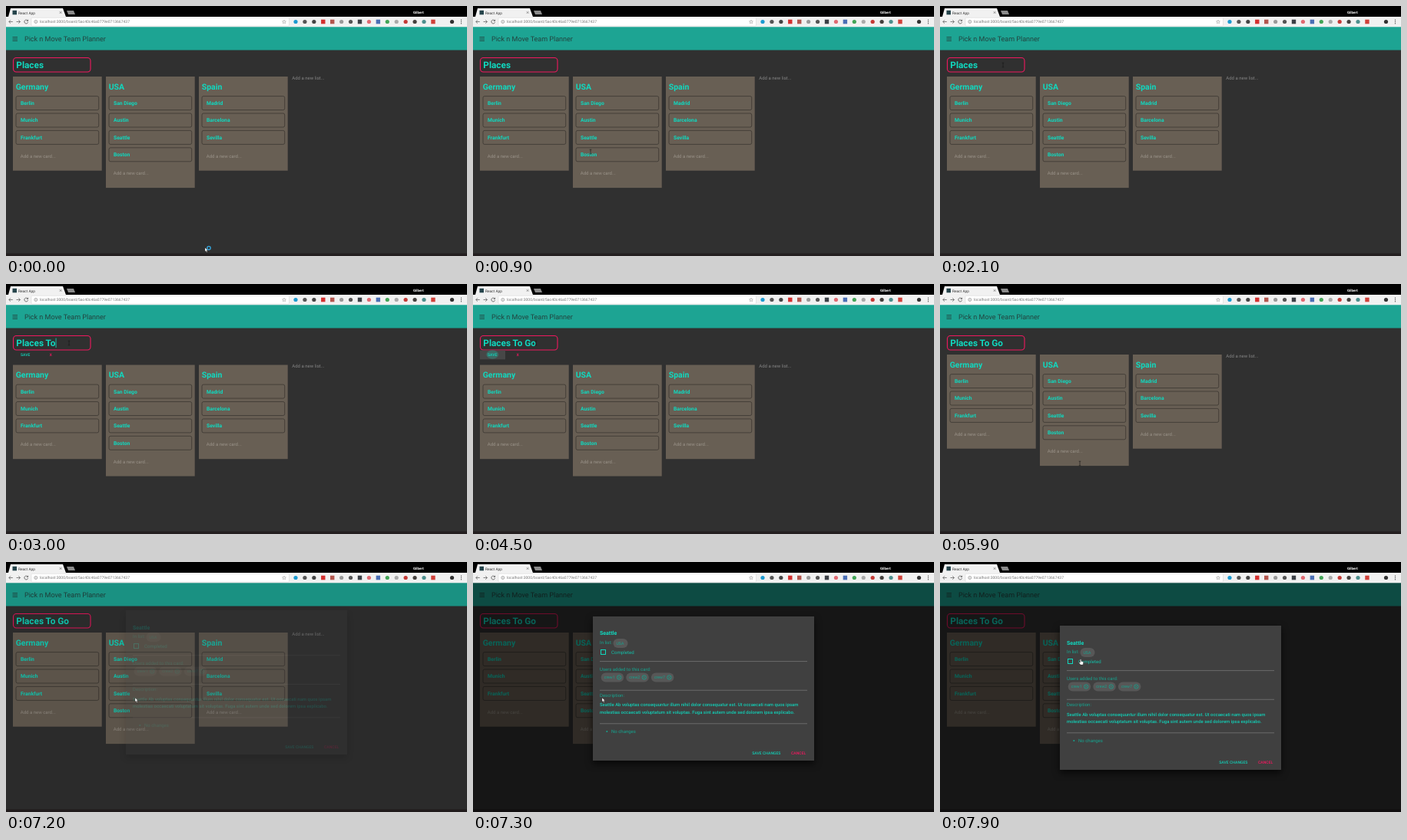
Animation of 600x326 px, one loop 8 s. Source, as an HTML page:

```html
<!DOCTYPE html>
<html lang="en">
<head>
<meta charset="utf-8">
<title>Board</title>
<style>
  html, body { margin: 0; width: 100%; height: 100%; overflow: hidden; background: #303030; }
  svg { display: block; width: 600px; height: 326px; }
  text { font-family: Roboto, Arial, sans-serif; white-space: pre; text-rendering: geometricPrecision; }
</style>
</head>
<body>
<svg id="stage" viewBox="0 0 600 326"></svg>
<script>
const TEAL = '#10d9c0', PINK = '#f0185f', DIM = '#15a48f', SHIFT = 13.5;
const stage = document.getElementById('stage');

function add(parent, tag, attrs, content) {
  const el = document.createElementNS('http://www.w3.org/2000/svg', tag);
  for (const k in attrs) el.setAttribute(k, attrs[k]);
  if (content !== undefined) el.textContent = content;
  return parent.appendChild(el);
}
const group = (parent = stage) => add(parent, 'g', {});
const rect = (p, x, y, width, height, fill, more) => add(p, 'rect', { x, y, width, height, fill, ...more });
const circle = (p, cx, cy, r, fill, more) => add(p, 'circle', { cx, cy, r, fill, ...more });
const line = (p, d, stroke, width = 0.8) => add(p, 'path', { d, stroke, 'stroke-width': width, fill: 'none' });
const text = (p, x, y, size, fill, str, weight = 400) =>
  add(p, 'text', { x, y, 'font-size': size, fill, 'font-weight': weight }, str);
const show = (el, on) => el.setAttribute('visibility', on ? 'visible' : 'hidden');
const move = (el, x, y) => el.setAttribute('transform', `translate(${x} ${y})`);

// Page header and board
rect(stage, 0, 0, 600, 326, '#303030');
rect(stage, 0, 322.5, 600, 3.5, '#241f20');
rect(stage, 0, 27, 600, 30.5, '#1da493');
line(stage, 'M8.5 40.7h6.5M8.5 43h6.5M8.5 45.3h6.5', '#23423e', 0.9);
text(stage, 24, 46, 9, '#23423e', 'Pick n Move Team Planner');

rect(stage, 9.5, 67.5, 100.5, 18.5, 'none', { rx: 4, stroke: PINK, 'stroke-width': 1.1 });
const title = text(stage, 13.3, 81, 11.8, TEAL, 'Places', 700);
const caret = rect(stage, 0, 70.5, 0.8, 12.5, TEAL);

const editBar = group();
const focus = group(editBar);
rect(focus, 9, 86.5, 33, 11.8, '#474747');
const pulse = add(focus, 'ellipse', { cx: 25.3, cy: 92, rx: 8, ry: 5.8, fill: '#3d6a64' });
text(editBar, 19, 93.6, 5, TEAL, 'SAVE', 500);
text(editBar, 56.8, 93.6, 4.8, PINK, 'X', 700);

const lists = group();
[['Germany', 'Berlin', 'Munich', 'Frankfurt'],
 ['USA', 'San Diego', 'Austin', 'Seattle', 'Boston'],
 ['Spain', 'Madrid', 'Barcelona', 'Sevilla']].forEach(([name, ...cards], i) => {
  const x = 9 + 121 * i;
  rect(lists, x, 92, 115.7, 55.5 + 22.4 * cards.length, '#685f54');
  text(lists, x + 3.7, 108.5, 10.5, TEAL, name, 700);
  cards.forEach((card, j) => {
    const y = 117.6 + 22.4 * j;
    rect(lists, x + 4, y, 107.7, 18, 'none', { rx: 2, stroke: '#35312d', 'stroke-width': 0.7 });
    text(lists, x + 10, y + 11.4, 6.75, TEAL, card, 700);
  });
  text(lists, x + 9.8, 130.6 + 22.4 * cards.length, 6, '#9a9389', 'Add a new card...');
});
text(lists, 372.3, 95.8, 6, '#858585', 'Add a new list...');

// Card dialog
const shade = rect(stage, 0, 27, 600, 299, '#000');
const dialog = group();
rect(dialog, 156, 83, 288, 188, '#404040', { style: 'filter: drop-shadow(0 4px 5px #000a)' });
text(dialog, 165, 107.5, 7, TEAL, 'Seattle', 700);
text(dialog, 165, 119, 6, DIM, 'In list:');
const chip = (x, y, w, str) => {
  rect(dialog, x, y, w, 12, '#575757', { rx: 6 });
  text(dialog, x + 4, y + 7.8, 5.2, DIM, str);
};
chip(182.5, 112, 19, 'USA');
rect(dialog, 166.5, 126.5, 6, 6, 'none', { stroke: TEAL, 'stroke-width': 1 });
text(dialog, 180, 131.8, 6.1, '#12bfa8', 'Completed');
text(dialog, 165, 154, 6, DIM, 'Users added to this card:');
['crew1', 'crew2', 'crew7'].forEach((user, i) => {
  const x = 166.7 + 32.6 * i;
  chip(x, 156.5, 29.5, user);
  circle(dialog, x + 23.5, 162.5, 2.7, 'none', { stroke: DIM, 'stroke-width': 0.8 });
  line(dialog, `M${x + 22.5} 161.5l2 2m0-2l-2 2`, DIM, 0.6);
});
text(dialog, 165, 188, 6, DIM, 'Description:');
text(dialog, 165, 200.5, 5.95, '#12cdb5',
  'Seattle Ab voluptas consequuntur illum nihil dolor consequatur est. Ut occaecati nam quos ipsam', 500);
text(dialog, 165, 209.6, 5.95, '#12cdb5',
  'molestias occaecati voluptatum sit voluptas. Fuga sint autem unde sed dolorem ipsa explicabo.', 500);
line(dialog, 'M165 141.6h270M165 179.3h270M165 222.8h270', '#858585', 0.6);
circle(dialog, 174.3, 233, 1, DIM);
text(dialog, 180, 235, 6, DIM, 'No changes');
text(dialog, 363.3, 263, 5.1, '#12cdb5', 'SAVE CHANGES', 500);
text(dialog, 414, 263, 5.1, PINK, 'CANCEL', 500);

// Browser frame
rect(stage, 0, 0, 600, 14, '#000');
rect(stage, 0, 14, 600, 13.3, '#f1f1f1');
add(stage, 'path', { d: 'M3 14l3-11h68l4 11z', fill: '#f1f1f1' });
add(stage, 'path', { d: 'M79 6h9l2 5h-9z', fill: '#8a8a8a' });
rect(stage, 8.5, 5.8, 5.5, 5.5, '#25444b');
text(stage, 16, 10.6, 4.8, '#333', 'React App');
line(stage, 'M69.8 7.2l2.6 2.6m0-2.6l-2.6 2.6', '#555', 0.6);
text(stage, 530, 10.4, 4.5, '#fff', 'Gilbert', 700);
line(stage, 'M8.8 20.5h-5m2.2-2.2l-2.2 2.2l2.2 2.2M13.5 20.5h5m-2.2-2.2l2.2 2.2l-2.2 2.2', '#666', 0.8);
line(stage, 'M28.3 19.2a2.4 2.4 0 1 0 .3 2M28.6 17.8v1.8h-1.8', '#555', 0.8);
rect(stage, 33, 15.3, 335.5, 10.8, '#fff', { rx: 1.2, stroke: '#d2d2d2', 'stroke-width': 0.5 });
circle(stage, 38.8, 20.5, 2, 'none', { stroke: '#777', 'stroke-width': 0.6 });
line(stage, 'M38.8 20.2v1.4M38.8 19.2v.5', '#777', 0.6);
text(stage, 44, 22.3, 5.03, '#777', 'localhost:3000/board/5ac40c46a0779e0713667437');
line(stage, 'M362 18.2l.7 1.6 1.7.1-1.3 1.1.4 1.7-1.5-.9-1.5.9.4-1.7-1.3-1.1 1.7-.1z', '#888', 0.5);
['#1c9ad0', '#555', '#444', '#d3302f', '#b3564e', '#9a9a9a', '#555', '#3c4046',
 '#e06a72', '#4b6fb5', '#43a557', '#aaa', '#c43a36', '#45413e', '#4d8f8d', '#d0413a']
  .forEach((color, i) => {
    const x = 377 + 11.93 * i;
    if ([3, 4, 7, 9, 15].includes(i)) rect(stage, x - 2.7, 17.7, 5.4, 5.6, color);
    else circle(stage, x, 20.5, 2.6, color);
  });
circle(stage, 580.5, 20.5, 2.6, '#333');
[18.3, 20.5, 22.7].forEach(y => circle(stage, 592.5, y, 0.7, '#555'));

// Pointers, each with its hot spot at the origin
const pointers = { arrow: group(), beam: group(), hand: group() };
add(pointers.arrow, 'path', { d: 'M0 0v5.3l1.2-1.1 1 2 .9-.4-.9-2h1.6z', fill: '#fff', stroke: '#111', 'stroke-width': 0.3 });
const busy = circle(pointers.arrow, 5, 0.6, 2.2, 'none', { stroke: '#35a8e0', 'stroke-width': 1.3 });
line(pointers.beam, 'M-1.3-2.8h2.6M0-2.8v5.6M-1.3 2.8h2.6', '#161616', 0.6);
add(pointers.hand, 'path', {
  d: 'M-.6 0q.7-.7 1.3 0v2.4l2.4.6q.6.2.5 1l-.5 3h-3.2l-2-2.6q0-.9 1.5-.2z',
  fill: '#fff', stroke: '#111', 'stroke-width': 0.3
});

const path = [
  [0, 259, 315], [100, 259, 315], [900, 153, 190], [1100, 153, 190], [1900, 82, 77], [4600, 82, 77],
  [5400, 182, 234], [6300, 182, 234], [7000, 168, 177], [7400, 168, 177], [7900, 183, 127], [8000, 183, 127]
];
const shapes = [[0, 'arrow'], [800, 'beam'], [4800, 'arrow'], [5300, 'beam'], [6700, 'hand'], [7200, 'arrow'], [7800, 'hand']];
const typed = [[0, 'Places'], [2700, 'Places '], [2800, 'Places T'], [3000, 'Places To'],
  [3200, 'Places To '], [3400, 'Places To G'], [3600, 'Places To Go']];

const clamp = v => Math.max(0, Math.min(1, v));
const latest = (steps, t) => steps.filter(s => s[0] <= t).pop()[1];

function pointerAt(t) {
  const i = path.findIndex(p => p[0] > t), [t0, x0, y0] = path[i - 1], [t1, x1, y1] = path[i];
  const u = (t - t0) / (t1 - t0), e = u * u * (3 - 2 * u);
  return [x0 + (x1 - x0) * e, y0 + (y1 - y0) * e];
}

function draw(t) {
  const editing = t >= 2200 && t < 4700, focused = editing && t >= 4200;
  title.textContent = latest(typed, t);
  caret.setAttribute('x', 13.6 + title.getComputedTextLength());
  show(caret, editing && !focused && t % 1000 < 500);
  show(editBar, editing);
  show(focus, focused);
  pulse.setAttribute('rx', 8 + Math.sin((t - 4500) / 250));
  move(lists, 0, editing ? SHIFT : 0);

  const fade = clamp((t - 7180) / 100), left = 1 - clamp((t - 7200) / 450);
  shade.setAttribute('opacity', 0.54 * fade);
  dialog.setAttribute('opacity', fade);
  show(dialog, fade > 0);
  move(dialog, 0, -20 * left * left);

  const shape = latest(shapes, t), [x, y] = pointerAt(t);
  for (const k in pointers) show(pointers[k], k === shape);
  show(busy, t < 200);
  move(pointers[shape], x, y);
}

function tick() {
  draw(performance.now() % 8000);
  requestAnimationFrame(tick);
}
tick();
</script>
</body>
</html>
```
